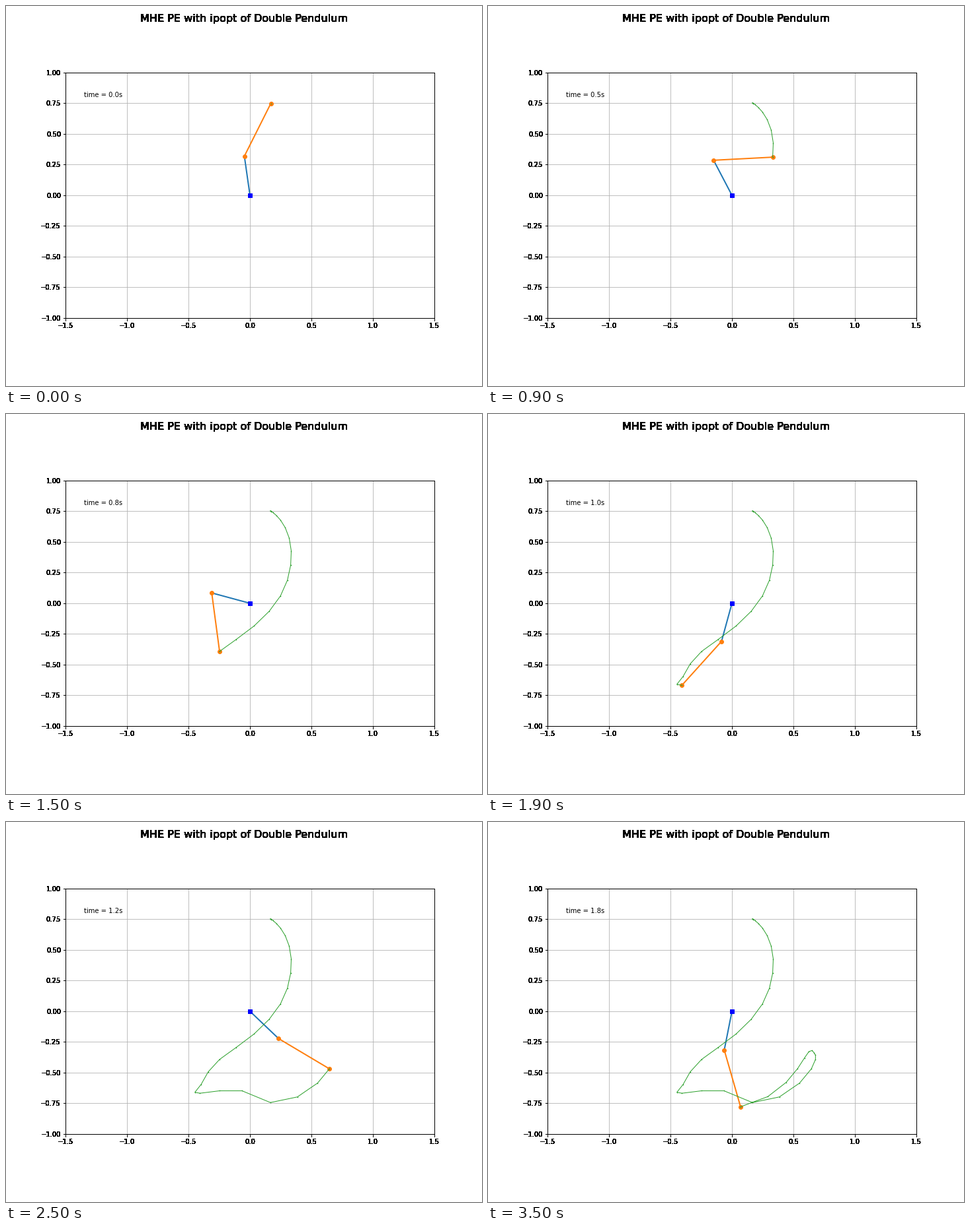
Animation, 720 px wide and 576 px high, one loop 3.6 s. Source, as a matplotlib script:

```python
import numpy as np
import matplotlib.pyplot as plt
from matplotlib.animation import FuncAnimation

W, H, DPI = 720, 576, 72
FRAMES, INTERVAL, DT = 36, 100, 0.05
L1, L2 = 0.322, 0.481   # link lengths
REPEATS = 30            # overprinting hardens the edges of static parts

# Key poses: step, upper link angle, lower link angle (degrees)
POSES = [
    (0, 98.1, 63.4),       # released near upright
    (4, 99.7, 56.2),
    (9, 117.6, 3.0),
    (12, 132.2, -39.1),    # folded
    (15, 164.8, -82.4),
    (17, 203.0, -102.1),
    (19, 254.7, -132.0),   # far left
    (21, 309.3, -124.0),
    (22, 305.2, -92.3),
    (25, 316.3, -30.8),
    (28, 307.0, -9.7),
    (30, 297.1, -5.0),     # turning point on the right
    (35, 258.8, -74.0),
]


def spline(x, keys, values):
    """Smooth cubic curve through the key values."""
    slope = np.gradient(values, keys, edge_order=2)
    k = np.clip(np.searchsorted(keys, x, side="right") - 1, 0, len(keys) - 2)
    h = keys[k + 1] - keys[k]
    u = (x - keys[k]) / h
    ease = u * u * (3 - 2 * u)
    return (values[k] + ease * (values[k + 1] - values[k])
            + h * u * (1 - u) * ((1 - u) * slope[k] - u * slope[k + 1]))


def polar(length, degrees):
    a = np.radians(degrees)
    return length * np.column_stack([np.cos(a), np.sin(a)])


def overprint(artist):
    draw = artist.draw

    def draw_often(renderer):
        for _ in range(REPEATS):
            draw(renderer)

    artist.draw = draw_often


keys, upper_angle, lower_angle = np.array(POSES, float).T
steps = np.arange(FRAMES)
joint = polar(L1, spline(steps, keys, upper_angle))
tip = joint + polar(L2, spline(steps, keys, lower_angle))

plt.rcParams["font.family"] = "DejaVu Sans"
fig = plt.figure(figsize=(W / DPI, H / DPI), dpi=DPI, facecolor="white")
title = fig.suptitle("MHE PE with ipopt of Double Pendulum", fontsize=16)
ax = fig.add_axes([90 / W, 103.1 / H, 558 / W, 372 / H])
ax.set(xlim=(-1.5, 1.5), ylim=(-1, 1),
       xticks=np.arange(-1.5, 1.6, 0.5), yticks=np.arange(-1, 1.1, 0.25))
ax.grid()

for part in (title, *ax.spines.values(), *ax.get_xticklabels(), *ax.get_yticklabels(),
             *ax.get_xticklines(), *ax.get_yticklines()):
    overprint(part)

upper, = ax.plot([], [], "-", lw=2, color="C0")
lower, = ax.plot([], [], "o-", lw=2, color="C1")
trace, = ax.plot([], [], "s-", lw=1, ms=1, mew=0.5, color="C2")
ax.plot([0], [0], "bs")
clock = ax.text(0.05, 0.9, "", transform=ax.transAxes)


def update(i):
    (jx, jy), (tx, ty) = joint[i], tip[i]
    upper.set_data([0, jx], [0, jy])
    lower.set_data([jx, tx], [jy, ty])
    trace.set_data(tip[:i + 1, 0], tip[:i + 1, 1])
    clock.set_text("time = %.1fs" % (i * DT))
    return upper, lower, trace, clock


anim = FuncAnimation(fig, update, frames=FRAMES, interval=INTERVAL,
                     repeat=True, repeat_delay=0, blit=False)
plt.show()
```
